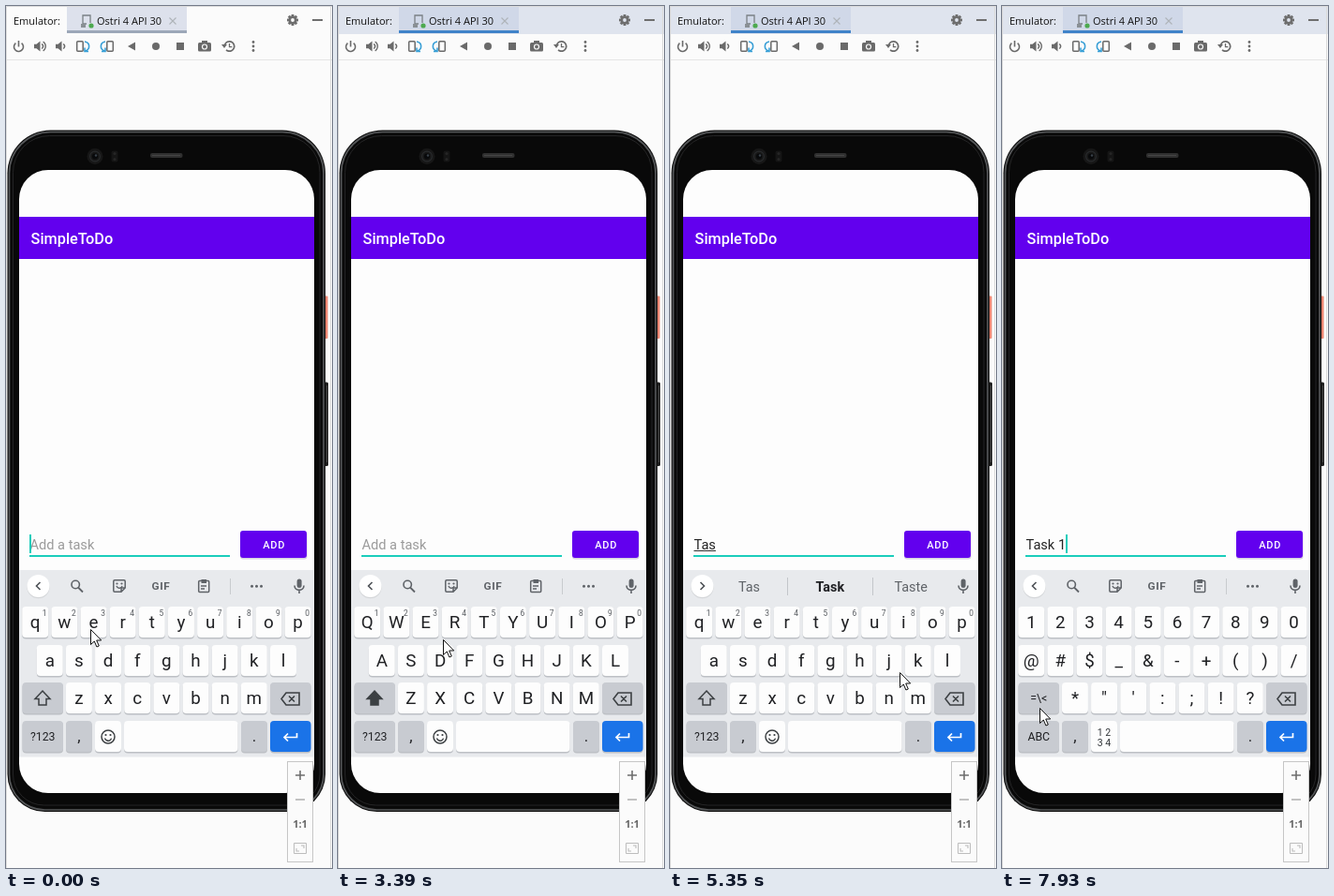
Recreate the animation shown at these times as an HTML page with a canvas. Size 348 by 920 pixels, loop 7990 ms.

```html
<!DOCTYPE html>
<html lang="en">
<head>
<meta charset="utf-8">
<title>Emulator</title>
<style>
html, body { margin: 0; width: 100%; height: 100%; overflow: hidden; background: #fbfbfb; }
canvas { display: block; }
</style>
</head>
<body>
<canvas id="stage" width="348" height="920"></canvas>
<script>
const ctx = document.getElementById('stage').getContext('2d');
const LOOP = 7990;
const BLINK = 490;
const UI = '"Open Sans", "Noto Sans", sans-serif';
const APP = 'Roboto, "Noto Sans", sans-serif';
const GREY = '#5f6368', TEAL = '#1bcdbb', PURPLE = '#6200ee', PANEL = '#fbfbfb';

// Pointer tip: time, x, y
const path = [
  [0, 90, 665], [60, 79, 640], [220, 3, 462], [1600, 2, 384], [1660, 104, 478],
  [1720, 88, 548], [1780, 77, 564], [2020, 77, 564], [2270, 184, 630],
  [2500, 128, 704], [2850, 37, 740], [3000, 37, 740], [3390, 112, 676],
  [3600, 122, 658], [3850, 122, 658], [4250, 44, 697], [4370, 44, 697],
  [4460, 68, 694], [4560, 76, 697], [4660, 76, 697], [4960, 165, 762],
  [5350, 245, 711], [5470, 264, 696], [5560, 264, 696], [5830, 190, 765],
  [6120, 186, 772], [6370, 95, 662], [6850, 36, 776], [7080, 36, 776],
  [7480, 30, 660], [7750, 30, 660], [7810, 32, 676], [7930, 40, 749], [LOOP, 40, 749]
];
// Moments at which the picture is sampled afresh, every 60 ms after each
const anchors = [0, 1600, 2030, 2850, 3680, 4520, 5350, 6130, 6970, 7810];
const taps = [0, 310, 1720, 3740, 4340, 4640, 5530, 6130, 7690];
const typed = [[0, ''], [3740, 'T'], [4340, 'Ta'], [4640, 'Tas'], [5530, 'Task'], [6130, 'Task '], [7690, 'Task 1']];
const hints = [
  [0, null], [3740, ['T', 'The', 'To']], [4340, ['Ta', 'Take', 'Talk']],
  [4640, ['Tas', 'Task', 'Taste']], [5530, ['Task', 'Tasks', 'Taste']],
  [6130, ['and', 'for', 'is']], [7810, null]
];
const modes = [[0, 'lower'], [2910, 'upper'], [3740, 'lower'], [7030, 'symbol']];

const latest = (list, t) => list.filter(e => e[0] <= t).pop()[1];

function box(x, y, w, h, r, fill) {
  ctx.beginPath();
  ctx.roundRect(x, y, w, h, r);
  ctx.fillStyle = fill;
  ctx.fill();
}
function rect(x, y, w, h, fill) {
  ctx.fillStyle = fill;
  ctx.fillRect(x, y, w, h);
}
function frame(x, y, w, h, r, color, width = 1) {
  ctx.beginPath();
  ctx.roundRect(x, y, w, h, r);
  ctx.strokeStyle = color;
  ctx.lineWidth = width;
  ctx.stroke();
}
function dot(x, y, r, fill) {
  ctx.beginPath();
  ctx.arc(x, y, r, 0, 7);
  ctx.fillStyle = fill;
  ctx.fill();
}
function arc(x, y, r, a, b, color, width = 1.5) {
  ctx.beginPath();
  ctx.arc(x, y, r, a, b);
  ctx.strokeStyle = color;
  ctx.lineWidth = width;
  ctx.stroke();
}
function shape(x, y, d, fill, stroke, width = 1.5) {
  const p = new Path2D(d);
  ctx.save();
  ctx.translate(x, y);
  if (fill) { ctx.fillStyle = fill; ctx.fill(p); }
  if (stroke) { ctx.strokeStyle = stroke; ctx.lineWidth = width; ctx.stroke(p); }
  ctx.restore();
}
function text(s, x, y, font, fill, align = 'left', spacing = 0) {
  ctx.font = font;
  ctx.fillStyle = fill;
  ctx.textAlign = align;
  ctx.letterSpacing = spacing + 'px';
  ctx.fillText(s, x, y);
}

function drawHeader(focused) {
  const back = focused ? '#dfe4ee' : PANEL;
  rect(0, 0, 348, 30, back);
  rect(65, 1, 128, 27, focused ? '#d0d8e8' : '#dde1ec');
  rect(65, 26, 128, 3, focused ? '#4083c9' : '#9ca7b8');
  rect(0, 57, 348, 1, '#e4e4e4');
  text('Emulator:', 8, 20, '11px ' + UI, '#111');
  text('Ostri 4 API 30', 97, 20, '11px ' + UI, '#111');
  shape(86, 16, 'M-4 5V-6H4V2M-4 3H0', null, '#7a8085', 1.3);
  shape(84, 20, 'M-4 -1H1V3H-4Z', '#8a9095');
  dot(91, 21, 2.6, '#4da94f');
  shape(178, 16, 'M-3.5 -3.5L3.5 3.5M3.5 -3.5L-3.5 3.5', null, '#aeb3b8', 1.1);
  for (let i = 0; i < 4; i++) {
    ctx.save();
    ctx.translate(306, 15);
    ctx.rotate(i * Math.PI / 4);
    rect(-1.4, -6, 2.8, 12, '#6e6e6e');
    ctx.restore();
  }
  arc(306, 15, 3.2, 0, 7, '#6e6e6e', 2.6);
  dot(306, 15, 1.9, back);
  rect(327, 14, 11, 2, '#6e6e6e');
}

function drawTools() {
  const c = '#6a6a6a', blue = '#389fd6';
  arc(13.5, 43.5, 5, -0.9, 4.05, c, 1.6);
  rect(12.7, 37, 1.6, 6.5, c);
  const speaker = 'M-6 -2.2H-3.5L0.5 -5.5V5.5L-3.5 2.2H-6Z';
  shape(36, 43, speaker, c);
  arc(36.5, 43, 3, -1, 1, c, 1.4);
  arc(36.5, 43, 5.8, -1, 1, c, 1.4);
  shape(59, 43, speaker, c);
  arc(59.5, 43, 3, -1, 1, c, 1.4);
  frame(75.7, 37.7, 6.5, 10.6, 1, c, 1.5);
  shape(86, 43, 'M-2 -5C4 -4 4 3 -1 5M-2 1.5V5.5H2', null, blue, 1.6);
  frame(107.8, 37.7, 6.5, 10.6, 1, c, 1.5);
  shape(104, 43, 'M2 -5C-4 -4 -4 3 1 5M2 1.5V5.5H-2', null, blue, 1.6);
  shape(134, 43, 'M-4 0L4 -4.5V4.5Z', c);
  dot(160, 43, 4, c);
  rect(182, 39, 8, 8, c);
  box(205, 39, 14, 9.5, 1.5, c);
  rect(209, 37, 6, 3, c);
  arc(212, 43.5, 2.5, 0, 7, PANEL, 1.2);
  arc(238.5, 43, 5.2, -2.8, 2.3, c, 1.7);
  shape(233, 42, 'M-3 -1H3L0 3Z', c);
  shape(238.5, 43, 'M0 -3V0.6H2.8', null, c, 1.3);
  for (const y of [38.5, 43, 47.5]) dot(264, y, 1.4, c);
}

function drawPhone() {
  const corners = r => [r, r, r - 6, r - 6];
  box(338, 309.5, 5.5, 45.5, 1, '#ee8470');
  box(338, 401.5, 6, 89.5, 1.5, '#1c1c1c');
  rect(342, 405, 1, 82, '#444');
  box(1.5, 132.5, 339.5, 727.5, corners(46), '#0d0d0d');
  frame(3.5, 134.5, 335.5, 723.5, corners(44), '#56585a', 1.6);
  box(5, 136, 332.5, 720, corners(42), '#090909');
  frame(7.5, 138.5, 327.5, 714.5, corners(39), '#2c2d2e', 0.8);
  dot(95, 160.5, 8.5, '#171717');
  arc(95, 160.5, 5.4, 0, 7, '#292b2d', 1.2);
  dot(95, 160.5, 3, '#08090b');
  dot(96, 159.5, 1.2, '#394149');
  box(112.5, 154.5, 7, 12, 2, '#151515');
  dot(116, 157.5, 1.5, '#262626');
  dot(116, 163.5, 1.5, '#262626');
  box(154, 157, 34.5, 5, 2, '#303030');
  rect(156, 159, 30, 1, '#454545');
  box(14, 175, 315, 665, 31, '#fdfdfd');
  rect(14, 225, 315, 45, PURPLE);
  text('SimpleToDo', 26.6, 253.5, '500 16.3px ' + APP, '#fff');
}

function drawZoom() {
  rect(300, 806, 28, 108, '#c6c6c6');
  rect(301, 807, 26, 106, PANEL);
  shape(314, 821, 'M-5 0H5M0 -5V5', null, '#6e6e6e', 1.6);
  shape(314, 847, 'M-5 0H5', null, '#b4b4b4', 1.6);
  text('1:1', 314, 877, 'bold 11px ' + UI, '#666', 'center');
  frame(307.5, 893.5, 13, 11, 0, '#bcbcbc');
  shape(314, 899, 'M-4 0V3H-1M4 0V-3H1', null, '#bcbcbc', 1.1);
}

function drawField(value, caret) {
  rect(25, 586, 214, 2, TEAL);
  text(value || 'Add a task', 25.5, 580, '14.6px ' + APP, value ? '#242424' : '#9b9b9b');
  const w = value ? ctx.measureText(value).width : 0;
  if (value && !value.includes(' ')) rect(25.5, 581, w, 1, '#303030');
  if (caret) rect(Math.round(25 + w), 564, 2, 20, TEAL);
  box(250, 561, 71.5, 29.5, 3, '#d6d2df');
  box(250, 560, 71, 29, 3, PURPLE);
  text('ADD', 286.2, 579, '500 11px ' + APP, '#fff', 'center', 0.8);
}

function drawStrip(words) {
  rect(14, 602, 315, 199.5, '#e8eaed');
  dot(34.5, 620, 12.2, '#d4d6d9');
  dot(34.5, 619, 12, '#fff');
  shape(34.5, 619, words ? 'M-2 -4L2 0L-2 4' : 'M2 -4L-2 0L2 4', null, '#4d5156', 1.6);
  box(310.6, 611.5, 5, 9.5, 2.5, GREY);
  shape(313, 619, 'M-5 -0.5C-5 6 5 6 5 -0.5M0 4.5V8', null, GREY, 1.6);
  if (words) {
    words.forEach((word, i) => {
      const bold = word === 'Task' && i === 1;
      text(word, 84.5 + i * 86.3, 625, (bold ? 'bold ' : '') + '14.4px ' + APP, bold ? '#202124' : GREY, 'center');
    });
    rect(125, 610, 1, 19, '#c3c6ca');
    rect(216, 610, 1, 19, '#c3c6ca');
    return;
  }
  arc(74.2, 617.5, 4.2, 0, 7, GREY, 1.6);
  shape(77, 620.5, 'M0 0L5 5', null, GREY, 1.8);
  shape(121, 619, 'M-5 -6.2H5Q6.2 -6.2 6.2 -5V2L2 6.2H-5Q-6.2 6.2 -6.2 5V-5Q-6.2 -6.2 -5 -6.2ZM2 6V2H6', null, GREY, 1.5);
  dot(118.5, 616.5, 1.1, GREY);
  dot(123.5, 616.5, 1.1, GREY);
  arc(121, 618, 3.2, 0.3, 2.8, GREY, 1.3);
  text('GIF', 165.5, 623, 'bold 11.8px ' + APP, GREY, 'center', 0.7);
  frame(205.7, 613.5, 11, 12, 1, GREY, 1.5);
  rect(208.5, 612, 5.5, 4, GREY);
  shape(211, 619, 'M-3 0H3M-3 3H1', null, GREY, 1.3);
  rect(239, 611, 1, 17, '#c8cbce');
  for (const x of [262.5, 267.5, 272.5]) dot(x, 619.3, 1.5, GREY);
}

const rowTop = r => Math.round(641 + r * 40.7);

function drawKey(x, y, w, label = '', fill = '#fdfdfd', size = 18.8) {
  box(x, y + 1, w, 33.5, 4, '#bdc0c5');
  box(x, y, w, 33, 4, fill);
  text(label, x + w / 2, Math.round(y + 16.5 + size * 0.34), size + 'px ' + APP, '#202124', 'center');
}

function drawKeys(mode) {
  const symbol = mode === 'symbol', upper = mode === 'upper';
  const pitch = 31.15, first = 31.2, dark = '#c8cbd1';
  const rows = symbol ? ['1234567890', '@#$_&-+()/', '*"\':;!?'] : ['qwertyuiop', 'asdfghjkl', 'zxcvbnm'];
  rows.forEach((row, r) => {
    const left = first + (10 - row.length) / 2 * pitch;
    [...row].forEach((ch, i) => {
      const x = left + i * pitch, y = rowTop(r);
      drawKey(x - 14, y, 28, upper ? ch.toUpperCase() : ch);
      if (!symbol && r === 0) text((i + 1) % 10, x + 10, y + 10, '8.4px ' + APP, '#55595e', 'center');
    });
  });
  drawKey(17.5, rowTop(2), 43.5, symbol ? '=\\<' : '', dark, 12.3);
  if (!symbol) shape(39, 739, 'M0 -8L8 0.5H4V7H-4V0.5H-8Z', upper ? '#3c4043' : null, '#3c4043', 1.5);
  drawKey(282, rowTop(2), 43.5, '', dark);
  shape(304, 739.5, 'M-10 0L-5 -6.5H9V6.5H-5ZM-2 -3L4 3M4 -3L-2 3', null, '#3c4043', 1.6);

  const y = rowTop(3);
  drawKey(17.5, y, 43.5, symbol ? 'ABC' : '?123', dark, 12.3);
  drawKey(64, y, 27.8, ',', dark, 17);
  drawKey(95, y, 28);
  if (symbol) {
    text('1 2', 109, 779, '10.5px ' + APP, '#303438', 'center');
    text('3 4', 109, 790, '10.5px ' + APP, '#303438', 'center');
  } else {
    arc(109, 780, 7, 0, 7, '#3c4043', 1.5);
    dot(106.5, 778, 1.1, '#3c4043');
    dot(111.5, 778, 1.1, '#3c4043');
    arc(109, 780.5, 3.7, 0.3, 2.85, '#3c4043', 1.4);
  }
  drawKey(126, y, 121.5);
  drawKey(251, y, 28, '.', dark, 17);
  drawKey(282, y, 43.5, '', '#1a73e8');
  shape(303.5, 780, 'M7 -4V0.5H-6M-2.5 -3.5L-6.5 0.5L-2.5 4.5', null, '#fff', 1.7);
}

function drawPointer(t) {
  if (t >= 300 && t < 1600) return;
  const i = path.findIndex(p => p[0] > t);
  const [a, b] = [path[i - 1], path[i]];
  const k = (t - a[0]) / (b[0] - a[0]);
  const x = Math.round(a[1] + (b[1] - a[1]) * k);
  const y = Math.round(a[2] + (b[2] - a[2]) * k);
  shape(x + 0.5, y + 0.5, 'M0 0V16L3.8 12.5L6.4 18.5L8.8 17.5L6.2 11.5H11.2Z', '#fff', '#111', 1);
}

function draw(now) {
  const time = now % LOOP;
  const start = anchors.filter(a => a <= time).pop();
  const t = start + Math.floor((time - start) / 60) * 60;
  const tap = taps.filter(a => a <= time).pop();
  rect(0, 0, 348, 920, PANEL);
  drawHeader(time >= 2850);
  drawTools();
  drawPhone();
  drawField(latest(typed, time), Math.floor((time - tap) / BLINK) % 2 === 0);
  drawStrip(latest(hints, time));
  drawKeys(latest(modes, time));
  drawZoom();
  rect(0, 0, 348, 1, '#dcdcdc');
  rect(0, 0, 1, 920, '#dcdcdc');
  rect(346, 0, 1, 920, '#dcdcdc');
  drawPointer(t);
}

let origin;
function tick(now) {
  origin ??= now;
  draw(Math.max(0, now - origin));
  requestAnimationFrame(tick);
}
draw(0);
requestAnimationFrame(tick);
</script>
</body>
</html>
```
